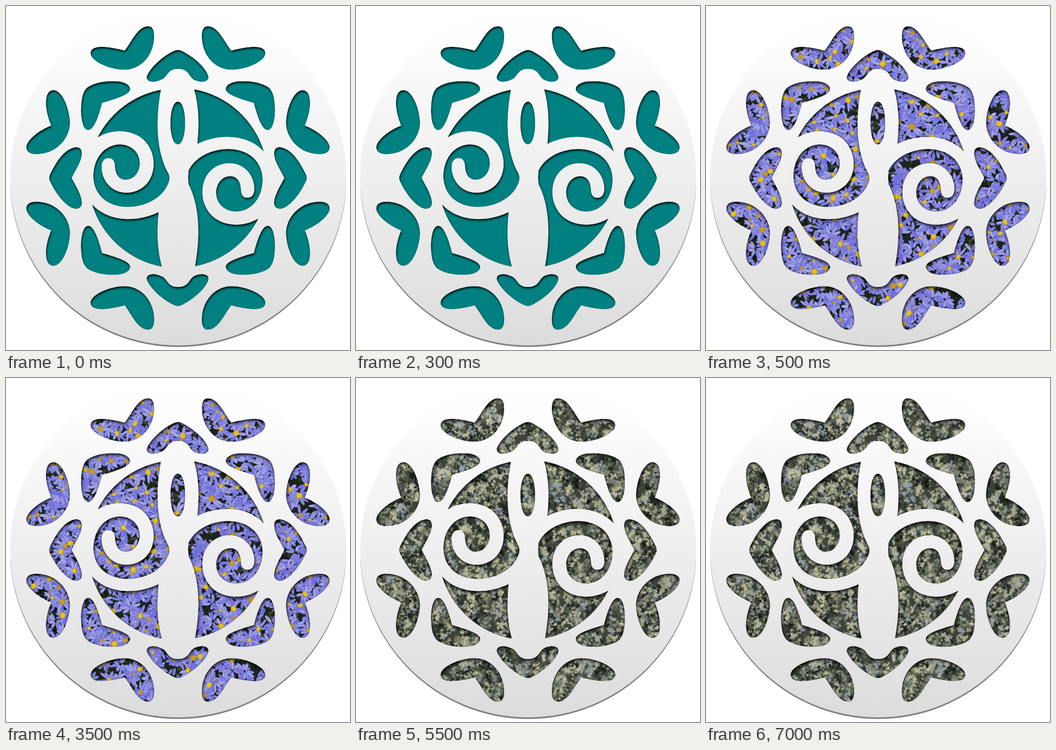
These frames come from a looping animation (748x748 px, 8 s). An HTML page with a canvas:

```html
<!DOCTYPE html>
<html lang="en">
<head>
<meta charset="utf-8">
<title>Cut-out medallion</title>
<style>
html, body { margin: 0; width: 100%; height: 100%; overflow: hidden; background: #fff; }
canvas { display: block; width: 100vw; height: 100vh; }
</style>
</head>
<body>
<canvas id="stage" width="748" height="748"></canvas>
<script>
const SIZE = 748, LOOP = 8000;
const view = document.getElementById('stage').getContext('2d');

function seeded(seed) {
  return () => {
    seed = (seed + 0x6D2B79F5) | 0;
    let t = Math.imul(seed ^ (seed >>> 15), 1 | seed);
    t = (t + Math.imul(t ^ (t >>> 7), 61 | t)) ^ t;
    return ((t ^ (t >>> 14)) >>> 0) / 4294967296;
  };
}

function layer(paint) {
  const canvas = document.createElement('canvas');
  canvas.width = canvas.height = SIZE;
  paint(canvas.getContext('2d'));
  return canvas;
}

// Holes are mirrored about the centre of the stage.
const holes = new Path2D();
function cut(d, ...flips) {
  const shape = new Path2D(d);
  for (const [sx, sy] of flips) {
    holes.addPath(shape, new DOMMatrix([sx, 0, 0, sy, sx < 0 ? SIZE : 0, sy < 0 ? SIZE : 0]));
  }
}
const SAME = [1, 1], FLIP_X = [-1, 1], FLIP_Y = [1, -1], TURN = [-1, -1];
const ALL = [SAME, FLIP_X, FLIP_Y, TURN];

cut('M258 97C272 80 286 44 309 44C320 44 323 55 322 72C320 103 300 132 268 138C235 143 184 122 184 103C184 82 225 88 258 97Z', ...ALL);
cut('M98 260C90 240 86 222 87 206C88 190 94 183 104 183C122 184 137 220 139 250C141 280 120 308 92 318C70 325 45 325 44 308C44 292 72 270 98 260Z', ...ALL);
cut('M209 211C203 235 192 270 179 270C165 270 161 235 164 210C165 196 169 184 177 177C195 165 220 162 245 164C262 166 271 174 270 182C268 194 235 203 209 211Z', ...ALL);
cut('M143 374C152 355 165 338 165 320C165 308 156 305 147 308C125 314 108 340 95 368Q93 374 95 380C108 408 130 437 150 441C160 442 166 436 165 426C163 408 152 392 143 374Z', SAME, FLIP_X);
cut('M367 97Q374 94 381 97C408 110 436 135 440 153C443 165 425 168 412 162C397 157 400 137 374 137C349 137 352 157 336 161C322 168 305 166 306 154C310 138 340 108 367 97Z', SAME, FLIP_Y);
cut('M409 181A195.7 195.7 0 0 1 561 317C530 282 470 274 416 300C420 260 420 220 409 181Z', SAME, TURN);
cut('M374 208C395 208 395 301 374 301C352 301 352 208 374 208Z', SAME);

const swirl = waist => `M411 566A195.7 195.7 0 0 0 549 462C525 476 500 478 480 473
  C445 465 427 435 427 405C427 368 452 342 486 342C518 342 540 368 540 398
  C540 410 534 417 525 417C514 417 512 408 511 402C511 382 502 370 488 370
  C470 370 457 386 457 406C457 430 476 447 500 447C535 447 559 415 558 375
  C556 335 525 311 483 311C445 311 410 330 397 358Q${waist} 374 397 388
  C418 428 425 490 411 566Z`;
cut(swirl(395), SAME);
cut(swirl(388), TURN);

const disc = new Path2D();
disc.arc(374.5, 372.5, 365.5, 0, Math.PI * 2);
const plate = new Path2D(disc);
plate.addPath(holes);

function paintTeal(c) {
  c.fillStyle = '#008080';
  c.fillRect(0, 0, SIZE, SIZE);
}

function paintDaisies(c) {
  const rnd = seeded(41);
  c.fillStyle = '#1d2418';
  c.fillRect(0, 0, SIZE, SIZE);
  for (let i = 0; i < 1500; i++) {
    c.fillStyle = ['#2f3d22', '#12170f', '#3c4a2c'][i % 3];
    c.beginPath();
    c.ellipse(rnd() * SIZE, rnd() * SIZE, 8, 3, rnd() * 6.3, 0, 6.3);
    c.fill();
  }
  const spots = [];
  for (let y = 0; y < SIZE + 30; y += 24) {
    for (let x = 0; x < SIZE + 30; x += 24) {
      spots.push([x + rnd() * 26 - 13, y + rnd() * 26 - 13, rnd()]);
    }
  }
  spots.sort((a, b) => a[2] - b[2]);
  for (const [x, y, order] of spots) daisy(c, rnd, x, y, order > 0.5);
}

function daisy(c, rnd, x, y, open) {
  const count = 11, start = rnd() * 6.3, squash = 0.65 + rnd() * 0.35;
  c.save();
  c.translate(x, y);
  c.rotate(rnd() * 6.3);
  c.scale(1, squash);
  for (let i = 0; i < count; i++) {
    if (rnd() < 0.25) continue;
    const length = 16 + rnd() * 8;
    c.save();
    c.rotate(start + (i + rnd() * 0.5) * 6.283 / count);
    c.fillStyle = `hsl(${236 + rnd() * 8} ${56 + rnd() * 16}% ${66 + rnd() * 13}%)`;
    c.strokeStyle = 'rgba(56,54,120,.4)';
    c.lineWidth = 0.7;
    c.beginPath();
    c.ellipse(length / 2 + 3, 0, length / 2, 3.7, 0, 0, 6.3);
    c.fill();
    c.stroke();
    c.restore();
  }
  if (open) {
    const r = 3.5 + rnd() * 3.5;
    c.fillStyle = '#a87c10';
    c.beginPath();
    c.arc(0, 0.8, r + 0.6, 0, 6.3);
    c.fill();
    c.fillStyle = rnd() < 0.75 ? '#e4c11c' : '#c99c18';
    c.beginPath();
    c.arc(0, 0, r, 0, 6.3);
    c.fill();
  }
  c.restore();
}

function paintFoliage(c) {
  const rnd = seeded(97);
  const tones = ['#171b18', '#252b25', '#4f5648', '#868b7a', '#99a2b0', '#b9ba92', '#737b6c', '#a9ad9c', '#c3c3a4'];
  c.fillStyle = '#3c4238';
  c.fillRect(0, 0, SIZE, SIZE);
  c.lineWidth = 1.1;
  for (let i = 0; i < 6500; i++) {
    const x = rnd() * SIZE, y = rnd() * SIZE;
    c.strokeStyle = tones[Math.floor(rnd() * tones.length)];
    c.beginPath();
    for (let k = 0; k < 6; k++) {
      const px = x + (rnd() + rnd() - 1) * 9, py = y + (rnd() + rnd() - 1) * 13;
      const r = 2.5 + rnd() * 2.5, turn = rnd() * 3;
      for (let a = 0; a < 3; a++) {
        const dx = r * Math.cos(turn + a * 1.05), dy = r * Math.sin(turn + a * 1.05);
        c.moveTo(px - dx, py - dy);
        c.lineTo(px + dx, py + dy);
      }
    }
    c.stroke();
  }
}

function scene(paint, blur) {
  const fill = layer(paint);
  return layer(c => {
    c.fillStyle = '#fff';
    c.fillRect(0, 0, SIZE, SIZE);

    // Dark rim under the lower half.
    c.save();
    c.beginPath();
    c.rect(0, 394, SIZE, SIZE);
    c.clip();
    c.translate(0, 3.5);
    c.fillStyle = '#808080';
    c.fill(disc);
    c.restore();

    const metal = c.createLinearGradient(0, 8, 0, 739);
    metal.addColorStop(0, '#fff');
    metal.addColorStop(0.1, '#fdfdfd');
    metal.addColorStop(0.45, '#f0f0f0');
    metal.addColorStop(1, '#dcdcdc');

    // The plate casts its shadow only into the holes.
    c.save();
    c.clip(holes);
    c.drawImage(fill, 0, 0);
    c.shadowColor = '#000';
    c.shadowBlur = blur;
    c.shadowOffsetX = 1;
    c.shadowOffsetY = 3;
    c.fillStyle = metal;
    c.fill(plate, 'evenodd');
    c.restore();

    c.fillStyle = metal;
    c.fill(plate, 'evenodd');
  });
}

const teal = scene(paintTeal, 4);
const daisies = scene(paintDaisies, 7);
const foliage = scene(paintFoliage, 6);

let origin = null;
function tick(now) {
  if (origin === null) origin = now;
  const t = (now - origin) % LOOP;
  view.drawImage(t < 500 ? teal : t < 5500 ? daisies : foliage, 0, 0);
  requestAnimationFrame(tick);
}
view.drawImage(teal, 0, 0);
requestAnimationFrame(tick);
</script>
</body>
</html>
```
